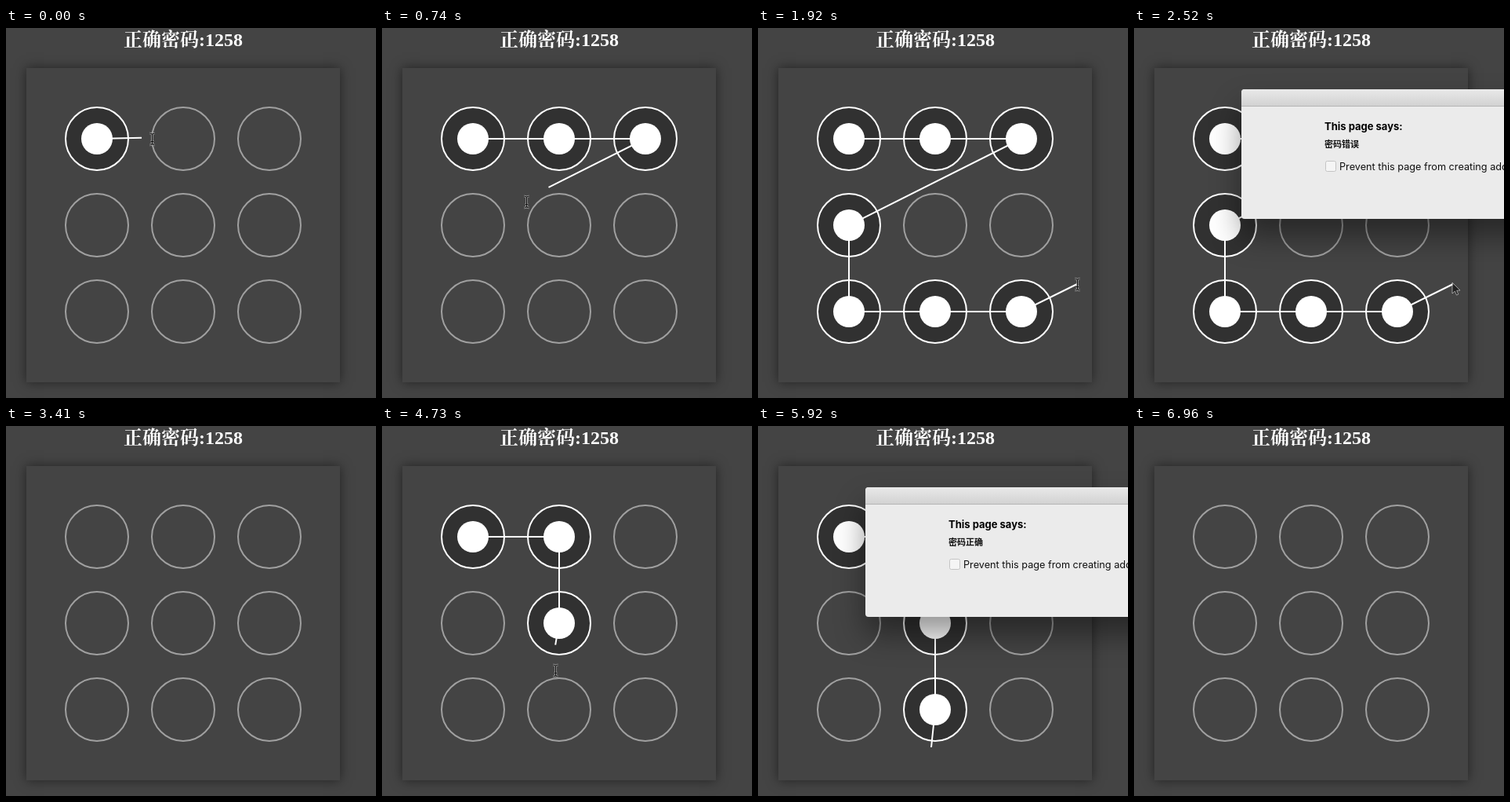
Write an HTML page with a canvas that moves like this. It is 472x471 px and loops after 7.85 s.

```html
<!DOCTYPE html>
<html lang="zh-CN">
<head>
<meta charset="utf-8">
<title>Pattern lock</title>
<style>
html, body { margin: 0; width: 100%; height: 100%; overflow: hidden; background: #444; }
canvas { display: block; }
</style>
</head>
<body>
<canvas id="stage" width="472" height="471"></canvas>
<script>
const ctx = document.getElementById('stage').getContext('2d');
const LOOP = 7850, STEPS = 53, STEP = LOOP / STEPS;
const LAG = 0.38; // the line trails the pointer, in steps
const SERIF = '"Liberation Serif", "Noto Serif CJK SC", "Noto Sans CJK SC", serif';
const SANS = 'Inter, Roboto, "Noto Sans CJK SC", sans-serif';

const nodes = Array.from({ length: 9 }, (_, k) => ({
  x: 116 + 110 * (k % 3),
  y: 141 + 110 * Math.floor(k / 3)
}));

// Each path lists the pointer's turning points: step, x, y
const attempts = [
  {
    press: 0, alert: 14, fade: 17, clear: 23, message: '密码错误',
    path: [
      [-1, 152, 138], [0, 186, 141], [3, 334, 126], [5, 184, 221],
      [7, 66, 296], [8, 72, 374], [12.6, 407, 326]
    ]
  },
  {
    press: 27, alert: 38, fade: 39, clear: 45, message: '密码正确',
    path: [
      [24, 330, 262], [27, 116, 141], [30, 222, 141], [32, 221, 311],
      [36.6, 221, 409], [45, 221, 409], [47, 232, 490]
    ]
  }
];

function pointAt(path, s) {
  const k = Math.max(1, path.findIndex(p => s <= p[0]));
  const next = s > path.at(-1)[0] ? path.length - 1 : k;
  const [s0, x0, y0] = path[next - 1], [s1, x1, y1] = path[next];
  const p = Math.min(1, Math.max(0, (s - s0) / (s1 - s0)));
  return { x: x0 + (x1 - x0) * p, y: y0 + (y1 - y0) * p };
}

// A node lights up once the line's end has come within its ring
function litNodes(attempt, step) {
  const lit = [nodes[0]];
  for (let s = attempt.press; s <= step; s++) {
    const p = pointAt(attempt.path, s - LAG);
    const hit = nodes.find(n => Math.hypot(n.x - p.x, n.y - p.y) < 40);
    if (hit && !lit.includes(hit)) lit.push(hit);
  }
  return lit;
}

function paint(fill, stroke, width = 1) {
  if (fill) { ctx.fillStyle = fill; ctx.fill(); }
  if (stroke) { ctx.strokeStyle = stroke; ctx.lineWidth = width; ctx.stroke(); }
}

function disc(n, r, fill, stroke) {
  ctx.beginPath();
  ctx.arc(n.x, n.y, r, 0, 2 * Math.PI);
  paint(fill, stroke, 2);
}

function text(str, x, y, font, color, align = 'left') {
  ctx.font = font;
  ctx.fillStyle = color;
  ctx.textAlign = align;
  ctx.fillText(str, x, y);
}

function shadow(color, blur, dy = 0) {
  ctx.shadowColor = color;
  ctx.shadowBlur = blur;
  ctx.shadowOffsetY = dy;
}

function drawPage() {
  ctx.fillStyle = '#444';
  ctx.fillRect(0, 0, 472, 471);
  ctx.save();
  shadow('rgba(0,0,0,.5)', 14);
  ctx.fillRect(26, 51, 400, 400);
  ctx.restore();
  text('正确密码:1258', 226, 23, 'bold 24px ' + SERIF, '#fff', 'center');
}

function drawPattern(lit, end) {
  for (const n of nodes) {
    if (lit.includes(n)) {
      disc(n, 40, '#313131', '#fff');
      disc(n, 20, '#fff');
    } else {
      disc(n, 40, null, '#a0a0a0');
    }
  }
  if (!end) return;
  ctx.beginPath();
  for (const p of [...lit, end]) ctx.lineTo(p.x, p.y);
  paint(null, '#fff', 2);
}

function drawBeam({ x, y }) {
  ctx.save();
  ctx.translate(Math.round(x) + 0.5, Math.round(y) + 0.5);
  ctx.beginPath();
  for (const d of [-1, 1]) {
    ctx.moveTo(-3.5, d * 7.5);
    ctx.quadraticCurveTo(0, d * 7.5, 0, d * 5);
    ctx.quadraticCurveTo(0, d * 7.5, 3.5, d * 7.5);
  }
  ctx.moveTo(0, -6);
  ctx.lineTo(0, 6);
  ctx.moveTo(-2, 3);
  ctx.lineTo(2, 3);
  paint(null, '#aaa', 2.4);
  paint(null, '#111', 1.1);
  ctx.restore();
}

function drawArrow({ x, y }, alpha = 1) {
  ctx.save();
  ctx.globalAlpha = alpha;
  ctx.translate(x - 1, y - 2);
  ctx.beginPath();
  for (const [px, py] of [[0, 0], [0, 14], [3.3, 11], [5.5, 16], [7.8, 15], [5.7, 10.2], [10, 10]])
    ctx.lineTo(px, py);
  ctx.closePath();
  paint('#000', '#fff');
  ctx.restore();
}

function drawDialog(message, depth) {
  ctx.save();
  ctx.beginPath();
  ctx.roundRect(137, 78, 420, 165, 4);
  shadow(`rgba(0,0,0,${depth})`, 38, 22);
  paint('#ebebeb');
  shadow('transparent', 0);
  ctx.clip();
  const bar = ctx.createLinearGradient(0, 78, 0, 100);
  bar.addColorStop(0, '#e9e9e9');
  bar.addColorStop(1, '#d1d1d1');
  ctx.fillStyle = bar;
  ctx.fillRect(137, 78, 420, 22);
  ctx.fillStyle = '#b5b5b5';
  ctx.fillRect(137, 99, 420, 1);
  ctx.restore();

  text('This page says:', 243, 130, 'bold 13px ' + SANS, '#000');
  text(message, 243, 152, 'bold 11px "Noto Sans CJK SC", sans-serif', '#111');
  ctx.beginPath();
  ctx.roundRect(244.5, 169.5, 13, 13, 2);
  paint('#f5f5f5', '#c4c4c4');
  text('Prevent this page from creating additional dialogs.', 262, 181, '12.7px ' + SANS, '#111');
}

function drawStep(step) {
  const a = attempts[step < attempts[0].clear ? 0 : 1];
  const pos = pointAt(a.path, step);
  const active = step >= a.press && step < a.clear;
  drawPage();
  drawPattern(active ? litNodes(a, step) : [], active && pointAt(a.path, step - LAG));

  if (!active) {
    if (step >= a.path[0][0]) drawArrow(pos);
  } else if (step < a.alert) {
    drawBeam(pos);
  } else {
    drawDialog(a.message, step === a.alert ? 0.3 : 0.42);
    if (step <= a.fade) drawArrow(pos, step === a.fade ? 0.5 : 1);
  }
}

const start = performance.now();
function frame() {
  const t = (performance.now() - start) % LOOP;
  drawStep(Math.min(STEPS - 1, Math.floor((t + 10) / STEP)));
  requestAnimationFrame(frame);
}
frame();
</script>
</body>
</html>
```
